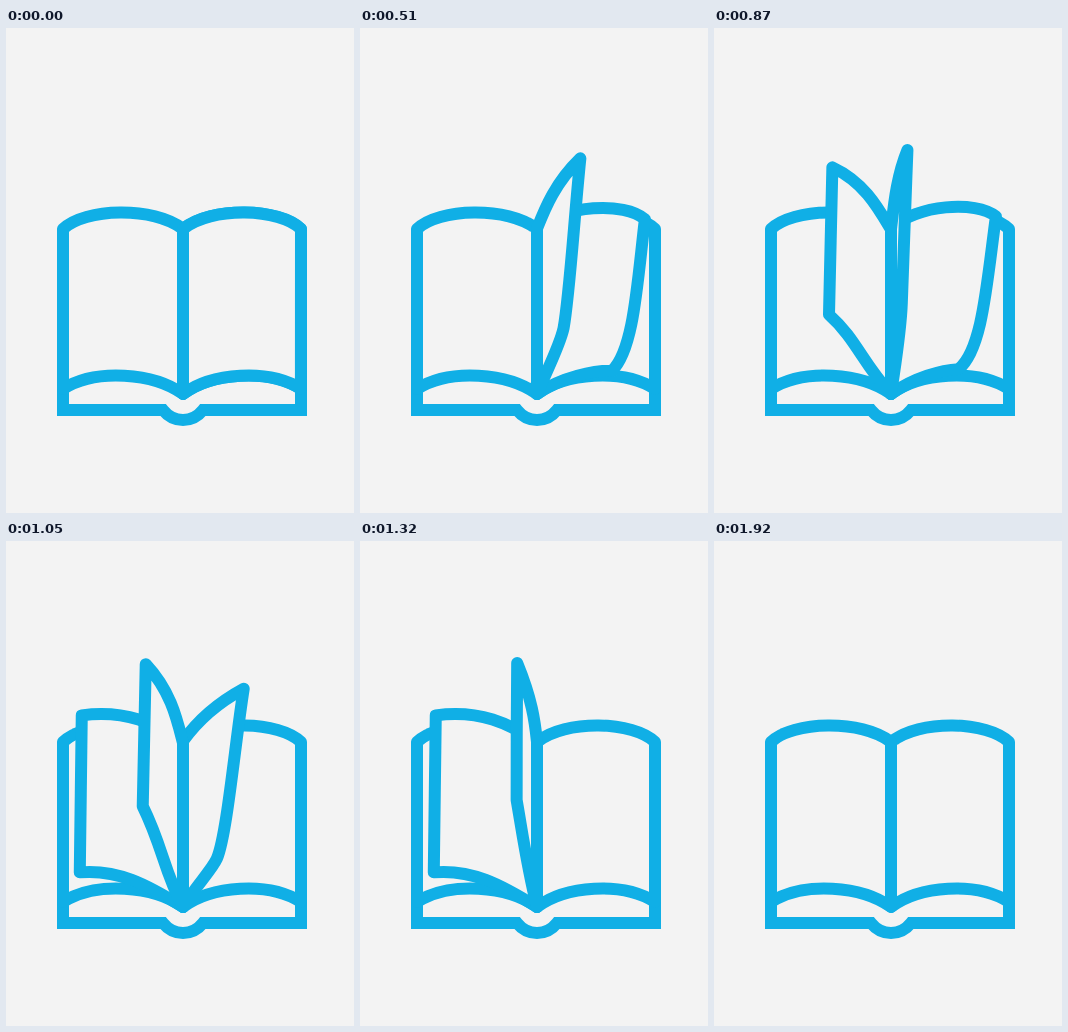
Animation of 348 by 485 pixels, one loop 3.03 s. Source, as an HTML page without scripts:

```html
<!DOCTYPE html>
<html lang="en">
<head>
<meta charset="utf-8">
<title>Turning pages</title>
<style>
html, body { margin: 0; width: 100%; height: 100%; overflow: hidden; background: #f3f3f3; }
svg { display: block; width: 348px; height: 485px; }
path { fill: none; stroke: #10afe6; stroke-width: 12; stroke-linejoin: round; stroke-linecap: round; }
.cover { stroke-linejoin: miter; stroke-linecap: butt; }

/* Each leaf is drawn twice so stacking can flip as it passes the spine. */
.leaf {
  fill: #f3f3f3;
  visibility: hidden;
  animation: turn 3030ms linear var(--wait) infinite both, var(--side) 3030ms step-end var(--wait) infinite;
}
.right { --side: rising; }
.left { --side: falling; }
.one { --wait: 0ms; }
.two { --wait: 270ms; }
.three { --wait: 600ms; }

@keyframes rising {
  0% { visibility: visible; }
  21.78%, 100% { visibility: hidden; }
}
@keyframes falling {
  0% { visibility: hidden; }
  21.78% { visibility: visible; }
  37.7%, 100% { visibility: hidden; }
}
/* top edge, outer edge, bottom edge, spine */
@keyframes turn {
  0% { d: path("M177 201 C205 178 274 180 295 201 C295 254 295 308 295 361 C262 340 205 345 177 366 Z"); }
  1.98% { d: path("M177 201 C205 178 274 179 294.5 200 C293 250 291.5 300 290 350 C270 348 215 341 177 366 Z"); }
  6.6% { d: path("M177 201 C204 177 268 175 289 195 C283 258 281 322 262 345 C244 343 205 347 177 366 Z"); }
  10.89% { d: path("M177 200 C202 176 257 170 276 183 C264 255 258 322 230 338 C215 341 195 352 177 366 Z"); }
  12.87% { d: path("M177 200 C200 176 232 162 257 165 C245 250 243 308 221 331 C210 340 195 353 177 366 Z"); }
  14.85% { d: path("M177 200 C190 182 210 163 238 148 C229 205 221 295 211 318 C206 329 190 345 177 366 Z"); }
  17.82% { d: path("M177 201 C183 178 189 150 212 122 C207 185 204 255 200 292 C197 312 186 340 177 366 Z"); }
  21.78% { d: path("M177 201 C177 175 176 148 175.5 122 C176 168 176 213 176 259 C177 295 177 330 177 366 Z"); }
  23.76% { d: path("M177 201 C175 180 172 158 157.5 122 C157 168 157 213 157 259 C163 295 167 325 177 366 Z"); }
  25.74% { d: path("M177 202 C171 178 165 150 140 123 C139 170 138 218 137 265 C157 306 158 330 177 366 Z"); }
  33.66% { d: path("M177 201 C153 183 126 161 83 166 C82 218 80 270 79 322 C118 319 134 345 177 366 Z"); }
  34.65% { d: path("M177 201 C150 183 120 168 76 174 C75 226 75 279 74 331 C112 328 140 343 177 366 Z"); }
  37.62%, 100% { d: path("M177 201 C148 178 78 180 57 201 C57 254 57 308 57 361 C90 340 148 345 177 366 Z"); }
}
</style>
</head>
<body>
<svg viewBox="0 0 348 485" aria-label="Open book with turning pages">
  <path class="cover" d="M57 201 V382 H157 Q165 392 177 392 Q189 392 197 382 H295 V201"/>
  <path d="M177 201 C205 178 274 180 295 201 V361 C262 340 205 345 177 366 Z"/>
  <path d="M177 201 C148 178 78 180 57 201 V361 C90 340 148 345 177 366 Z"/>

  <path class="leaf right three"/>
  <path class="leaf right two"/>
  <path class="leaf right one"/>

  <path class="leaf left one"/>
  <path class="leaf left two"/>
  <path class="leaf left three"/>
</svg>
</body>
</html>
```
